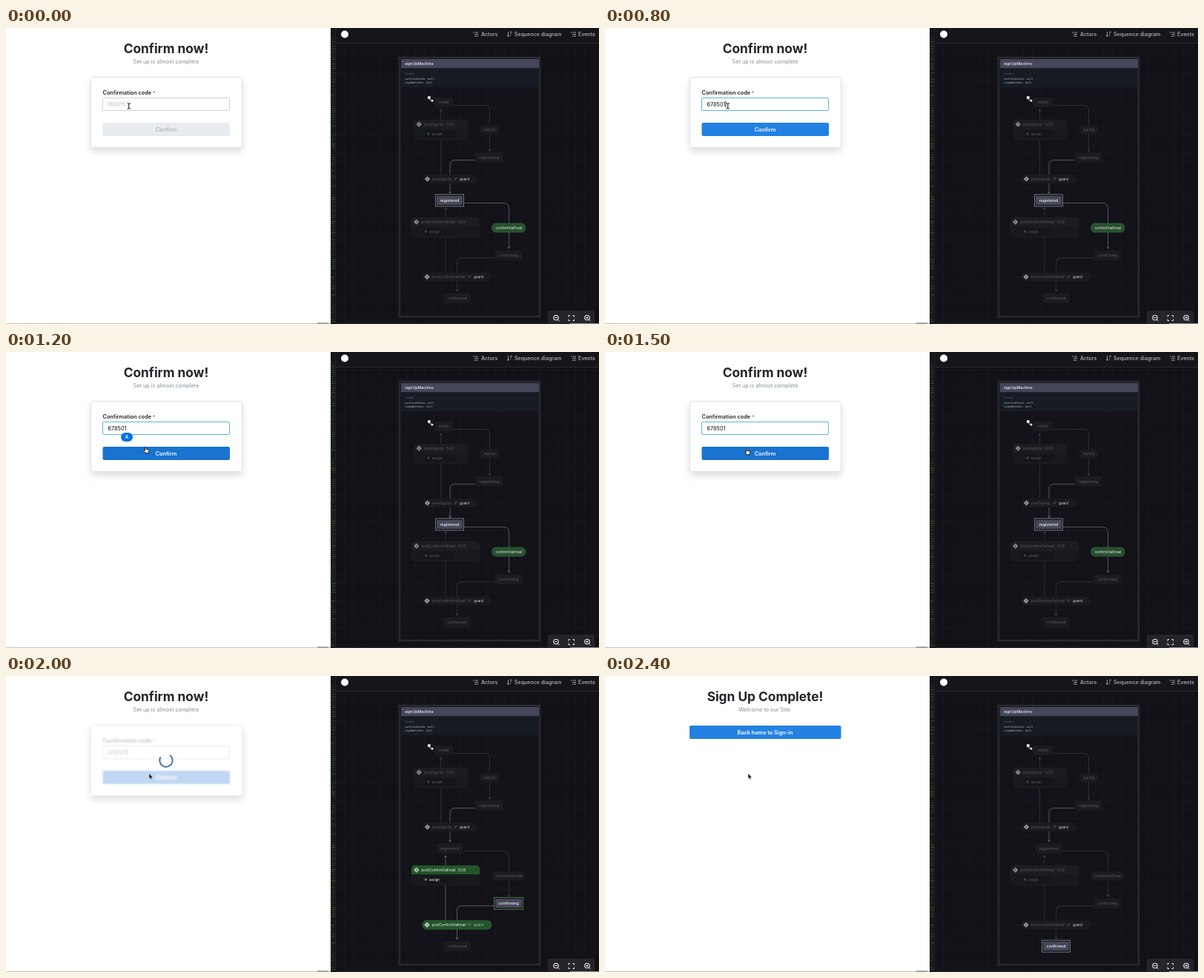
Animation, 800 px wide and 400 px high, one loop 2500 ms. Source, as an HTML page:

```html
<!DOCTYPE html>
<html lang="en">
<head>
<meta charset="utf-8">
<style>
html, body { margin: 0; width: 100%; height: 100%; overflow: hidden; background: #fff; }
svg { display: block; width: 800px; height: 400px; }
text { font-family: Inter, "Open Sans", sans-serif; white-space: pre; }
.mono { font-family: "DejaVu Sans Mono", monospace; }
</style>
</head>
<body>
<svg id="stage" viewBox="0 0 800 400">
  <defs>
    <filter id="blur" x="-10%" y="-10%" width="120%" height="120%"><feGaussianBlur stdDeviation="1"/></filter>
    <filter id="shadow" x="-20%" y="-20%" width="140%" height="160%">
      <feDropShadow dx="0" dy="5" stdDeviation="5" flood-opacity=".13"/>
    </filter>
    <pattern id="grid" width="12" height="12" patternUnits="userSpaceOnUse">
      <path d="M0 .5H12M.5 0V12" stroke="#17171d" fill="none"/>
    </pattern>
  </defs>
  <rect width="438" height="400" fill="#fff"/>
  <path d="M0 399.5H438" stroke="#c4c4c6"/>
  <path d="M420 399H435" stroke="#a4a4a6" stroke-width="2"/>
  <g id="left"></g>
  <g id="strip"></g>
  <g id="panel"></g>
  <g id="chart"></g>
  <g id="pointer"></g>
</svg>
<script>
const $ = id => document.getElementById(id);
const LOOP = 2500, FOCUS = 400, PASTE = 700, LOADING = 1900, DONE = 2300;

const rect = (x, y, w, h, fill, r = 0, extra = '') =>
  `<rect x="${x}" y="${y}" width="${w}" height="${h}" rx="${r}" fill="${fill}" ${extra}/>`;
const text = (x, y, size, fill, s, extra = '') =>
  `<text x="${x}" y="${y}" font-size="${size}" fill="${fill}" ${extra}>${s}</text>`;
const line = (d, stroke, width = 1, extra = '') =>
  `<path d="${d}" stroke="${stroke}" stroke-width="${width}" fill="none" ${extra}/>`;
const mid = 'text-anchor="middle"', semi = 'font-weight="600"';

// Form page

const heading = (title, sub) =>
  text(216, 34, 17.3, '#212529', title, mid + ' font-weight="700"') +
  text(216, 48.2, 7.3, '#868e96', sub, mid);

function button(x, y, w, fill, color, label) {
  return rect(x, y, w, 18, fill, 2) + text(216, y + 11.7, 7.3, color, label, `${mid} ${semi}`);
}

function fields(t) {
  const focused = t >= FOCUS, filled = t >= PASTE;
  const since = filled ? t - PASTE : t - FOCUS;
  const caret = focused && since % 1000 < 500;
  const fill = !filled ? '#e9ecef' : t >= 1100 ? '#1a73d1' : '#2281e2';
  return text(130.5, 90.3, 7.3, '#212529', 'Confirmation code', semi) +
    text(198, 90.8, 7.3, '#777', '*') +
    rect(130.5, 94.5, 171, 17, '#fff', 1.5, `stroke="${focused ? '#5db4d9' : '#ced4da'}"`) +
    text(137.5, 106.1, 7.3, filled ? '#111' : '#b4b9be', filled ? '678501' : '000111') +
    (caret ? line(`M${filled ? 163 : 137.5} 98.5V108`, '#222', .8) : '') +
    button(130.5, 128, 171.5, fill, filled ? '#fff' : '#adb5bd', 'Confirm');
}

function spinner(t) {
  return `<g transform="translate(216 114) rotate(${(t - 2000) * .36})">` +
    line('M5.2 -7A8.7 8.7 0 1 1 -7.5 -4.4', '#5279ad', 2.1) + '</g>';
}

function badge() {
  return rect(155, 109, 16, 12, '#0b6fe4', 6) + text(163, 117.3, 6, '#fff', 'A', `${mid} ${semi}`);
}

function page(t) {
  if (t >= DONE) return heading('Sign Up Complete!', 'Welcome to our Site.') +
    button(114, 67, 204.5, '#2281e2', '#fff', 'Back home to Sign-in');
  const busy = t >= LOADING;
  return heading('Confirm now!', 'Set up is almost complete') +
    rect(114.5, 66.5, 204, 95, '#fff', 3, `stroke="${busy ? '#f0f1f3' : '#dee2e6'}" filter="url(#shadow)"`) +
    `<g ${busy ? 'opacity=".28" filter="url(#blur)"' : ''}>${fields(t)}</g>` +
    (busy ? spinner(t) : '') +
    (t >= 1000 && t < 1500 ? badge() : '');
}

function pointer(t) {
  if (t >= LOADING) return '<path d="M193 131.5V139.2L194.8 137.6L196 140.3L197.2 139.7L196 137.2H198.3Z" fill="#111" stroke="#fff" stroke-width=".5"/>';
  if (t < 1000) return line('M163.7 101.6Q165.8 101.6 165.8 103V108Q165.8 109.3 163.7 109.3M167.9 101.6Q165.8 101.6 165.8 103M165.8 108Q165.8 109.3 167.9 109.3', '#111', 1);
  const k = Math.min(1, (t - 900) / 300), m = Math.max(0, Math.min(1, (t - 1200) / 400));
  const x = 166 + 23 * k + 4 * m, y = 105 + 27 * k + 3 * m;
  return `<path transform="translate(${x} ${y})" d="M-1.5 -3.3Q-.5 -4.3 .1 -3V-.8Q3.8 -1 3.8 1.5L3 4.6H-1L-3.2 1.2Q-2.7 .2 -1.4 1.2Z" fill="#fff" stroke="#111" stroke-width=".9"/>`;
}

// Inspector frame

function strip() {
  let seed = 7, out = rect(438, 0, 7, 400, '#14181a');
  const random = () => (seed = seed * 16807 % 2147483647) / 2147483647;
  for (let y = 12; y < 398; y += 3) {
    const w = 1 + random() * 5, green = 48 + random() * 32 | 0;
    out += rect(439, y, w, 1.2, `rgb(${green - 14},${green},32)`);
  }
  return out + line('M444.5 0V400', '#202226');
}

function panel() {
  const icon = '#a9a9b0', tabs = [[641, 'Actors'], [686, 'Sequence diagram'], [772, 'Events']];
  const lens = x => `<circle cx="${x}" cy="391.5" r="3.2" fill="none" stroke="#eee" stroke-width="1.1"/>` +
    line(`M${x + 2.4} 394L${x + 4.5} 396M${x - 1.6} 391.5H${x + 1.6}`, '#eee');
  return rect(445, 0, 355, 400, '#111117') + rect(445, 20, 355, 380, 'url(#grid)', 0, 'opacity=".75"') +
    rect(445, 0, 355, 20, '#15151a') + line('M445 20.5H800', '#26262c') +
    '<circle cx="457" cy="8.5" r="5" fill="#fff"/>' +
    tabs.map(([x, s]) => text(x, 10.9, 7, '#a5a5ad', s, semi)).join('') +
    line('M630 6H632M633 6H637M632 8.5H637M632 11H637', icon, .9) +
    line('M677.5 5V11.5L676 10M677.5 11.5L679 10M680 5.5H683M680 8H682M680 10.5H681', icon, .9) +
    line('M762 6H764M765 6H769M764 8.5H769M764 11H769', icon, .9) +
    rect(731, 382, 63, 20, '#24242b', 3) + lens(742) + lens(784) + line('M784 389.9V393.1', '#eee') +
    line('M759 390.5V388.5H761M764.5 388.5H766.5V390.5M766.5 393.5V395.5H764.5M761 395.5H759V393.5', '#eee') +
    line('M445 399.5H760', '#25252a') + line('M761 399.5H800', '#96969a');
}

// State chart

const DIM = '#5a5a61', BRIGHT = '#f2f2f4';

function node(x, y, w, name, on, rim = '#73737f') {
  return (on ? rect(x - 1.5, y - 2.5, w + 3, 16, '#17171d', 0, `stroke="${rim}"`) : '') +
    rect(x, y - .5, w, 12, on ? '#47485a' : '#1b1b20', 1, on ? '' : 'stroke="#212126" stroke-width=".6"') +
    text(x + w / 2, y + 7.4, 5.3, on ? BRIGHT : DIM, name, mid + (on ? ' font-weight="500"' : ''));
}

function pill(x, y, w, name, on) {
  return rect(x, y, w, 12, on ? '#28502f' : '#1b1c20', 5.5, on ? 'stroke="#326239" stroke-width=".7"' : '') +
    text(x + w / 2, y + 7.6, 4.7, on ? BRIGHT : DIM, name, mid);
}

function diamond(x, y, color) {
  return `<path d="M${x} ${y - 3.6}L${x + 3.6} ${y}L${x} ${y + 3.6}L${x - 3.6} ${y}Z" fill="${color}"/>` +
    line(`M${x} ${y - 1.7}V${y + 1.7}M${x - 1} ${y}H${x + 1}`, '#33343a', .6);
}

function otherwise(x, y, w, name, elseX, boxX, boxW, on) {
  const color = on ? BRIGHT : DIM;
  return rect(x, y, w, 27, '#18191d', 5, 'stroke="#1f2024" stroke-width=".6"') +
    `<path d="M${x} ${y + 12}V${y + 5}Q${x} ${y} ${x + 5} ${y}H${x + w - 5}Q${x + w} ${y} ${x + w} ${y + 5}V${y + 12}Z" fill="${on ? '#24552a' : '#1c1d21'}"/>` +
    diamond(x + 6.7, y + 6.2, on ? '#b9cbbb' : '#8d8e93') +
    text(x + 13.5, y + 7.8, 4.7, color, name) + text(elseX, y + 7.8, 4.4, color, 'ELSE') +
    rect(boxX, y + 13.5, boxW, 11.5, '#15161a', 1, 'stroke="#1f2024" stroke-width=".5"') +
    line(`M${boxX + 3} ${y + 19}H${boxX + 6.8}M${boxX + 4.9} ${y + 17.1}V${y + 20.9}`, on ? '#aaa' : '#55555c', .9) +
    text(boxX + 9.5, y + 20.6, 4.6, color, 'assign');
}

function guard(x, y, w, name, ifX, on) {
  return rect(x, y, w, 12, on ? '#24552a' : '#1a1b1f', 5.5, on ? 'stroke="#2f6836" stroke-width=".6"' : '') +
    diamond(x + 6, y + 6, on ? '#d5e0d6' : '#a0a1a6') +
    text(x + 12.5, y + 7.6, 4.7, on ? BRIGHT : DIM, name) +
    text(ifX, y + 7.6, 4.3, on ? '#8fa892' : '#707078', 'IF', 'font-style="italic"') +
    text(ifX + 7, y + 7.6, 4.7, on ? '#a3b8a6' : '#d8d8dc', 'guard');
}

function edge(d, x, y, dir, on) {
  const color = on ? '#55565e' : '#37383f';
  return line(d, color, on ? 1 : .8) +
    `<path d="M${x} ${y}l-2 ${-3.5 * dir}h4Z" fill="${color}"/>`;
}

function chart(state) {
  const idle = state === 'registered', busy = state === 'confirming', done = state === 'confirmed';
  return rect(531, 40, 189, 350, '#121218', 0, 'stroke="#29292f" stroke-width="2.6"') +
    rect(532.3, 80, 186.4, 308.7, 'url(#grid)', 0, 'opacity=".7"') +
    rect(533, 42, 186, 12.5, '#45465a') + text(538, 50, 5.2, BRIGHT, 'signUpMachine', 'font-weight="500"') +
    rect(533, 54.5, 186, 26, '#171b23') + text(538, 63, 3.5, '#50678f', 'Context') +
    text(538, 69.9, 3.7, '#bbbcc2', 'confirmState: null', 'class="mono"') +
    text(538, 74.6, 3.7, '#bbbcc2', 'signUpState: null', 'class="mono"') +
    '<circle cx="570.8" cy="94" r="2.1" fill="#fff"/>' + line('M571 95Q571 98 575 98', '#ddd', .8) +
    '<path d="M577 98.2l-3 -2v4Z" fill="#fff"/>' +
    edge('M604 104.5H646Q652.5 104.5 652.5 111V165', 652.5, 168, 1) +
    edge('M633 178.5H606Q599 178.5 599 185V222', 599, 225, 1, true) +
    edge('M586.5 197V112', 586.5, 109, -1) +
    edge('M618 236.5H671Q678.5 236.5 678.5 244V295', 678.5, 299, 1, idle) +
    edge('M659 310.5H615Q608.5 310.5 608.5 317V354', 608.5, 357, 1, busy) +
    edge('M593 330V245', 593, 241.5, -1, busy) +
    node(578, 95, 25, 'initial') +
    node(634, 169.5, 36, 'registering') +
    node(581, 227.5, 35, 'registered', idle) +
    node(660, 301.8, 36, 'confirming', busy, '#477748') +
    node(591, 359.6, 35, 'confirmed', done) +
    pill(639, 131.5, 27, 'signUp') +
    pill(655.5, 264, 45.5, 'confirmViaEmail', idle) +
    otherwise(550.5, 124, 72, 'postSignUp', 594, 565, 42) +
    otherwise(547, 256, 92, 'postConfirmViaEmail', 610, 561.5, 44, busy) +
    guard(562.5, 198, 73, 'postSignUp', 605) +
    guard(562, 330.3, 93, 'postConfirmViaEmail', 624, busy);
}

$('strip').innerHTML = strip();
$('panel').innerHTML = panel();

let lastStep = -1;
function draw(now) {
  const step = Math.floor(now % LOOP / 100);
  if (step !== lastStep) {
    const t = step * 100;
    $('left').innerHTML = page(t);
    $('pointer').innerHTML = pointer(t);
    $('chart').innerHTML = chart(t >= DONE ? 'confirmed' : t >= LOADING ? 'confirming' : 'registered');
    lastStep = step;
  }
}
function tick() {
  draw(performance.now());
  requestAnimationFrame(tick);
}
tick();
</script>
</body>
</html>
```
